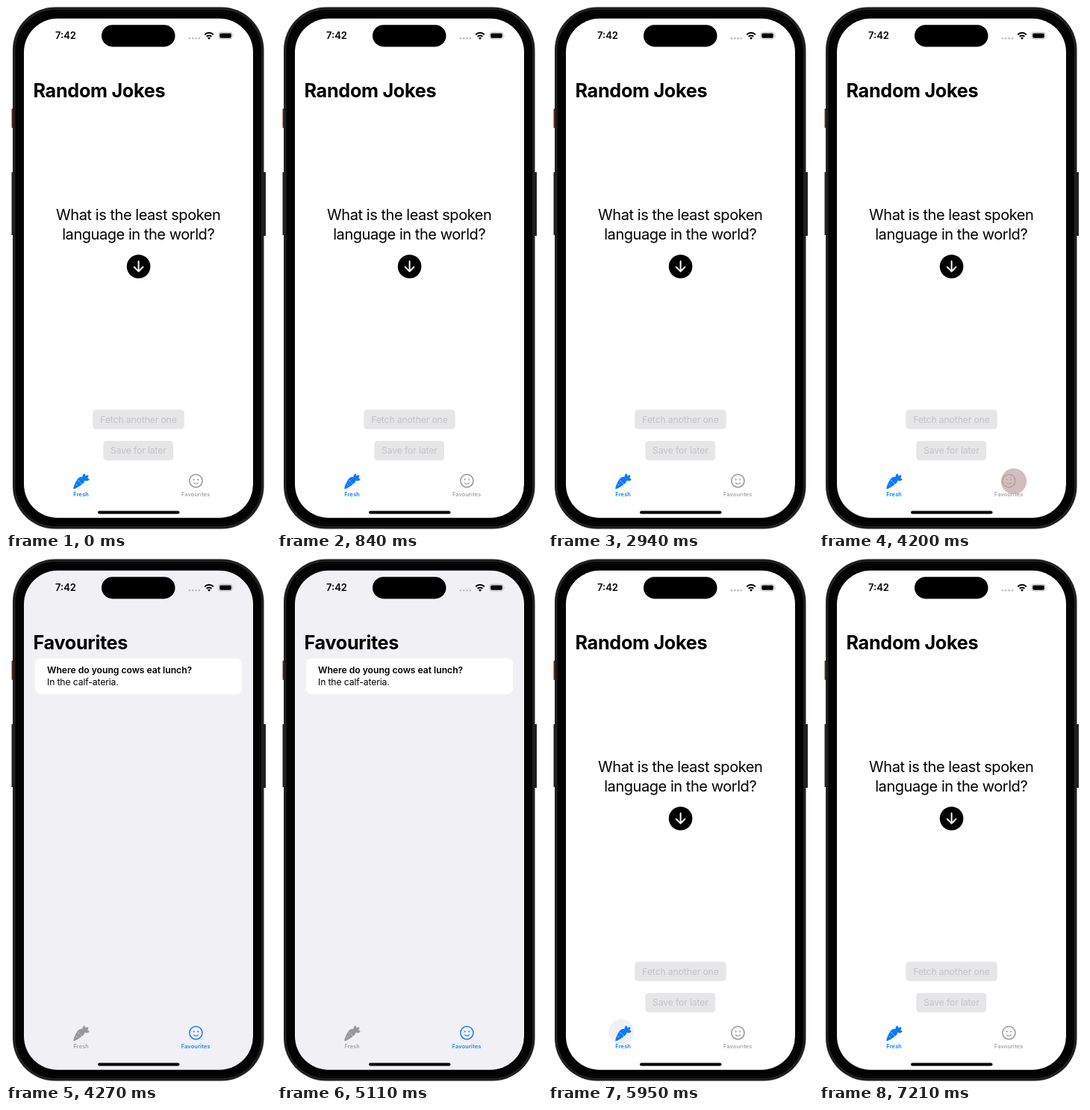
An HTML page for the animation above (8 s loop, 355 by 700 pixels).

```html
<!DOCTYPE html>
<html lang="en">
<head>
<meta charset="utf-8">
<title>Random Jokes</title>
<style>
html, body { margin: 0; width: 100%; height: 100%; overflow: hidden; background: #fff; }
svg { display: block; width: 355px; height: 700px; }
text { font-family: Inter, "Liberation Sans", sans-serif; fill: #000; }
.mid { text-anchor: middle; }
.title { font-size: 25.2px; font-weight: 700; letter-spacing: -.3px; }
.ask { font-size: 20px; letter-spacing: -.45px; }
.body { font-size: 12.2px; letter-spacing: -.13px; }
.head { font-weight: 600; letter-spacing: -.04px; }
.off { fill: #c3c3c5; }
.tab { color: #98989b; }
.tab.on { color: #0a7aff; }
#savedTab.on { color: #1680f5; }
.tab text { font-size: 7.3px; font-weight: 500; letter-spacing: .2px; fill: currentColor; }
.tab.on text { font-weight: 600; }
</style>
</head>
<body>
<svg viewBox="0 0 355 700">
  <!-- phone body -->
  <rect x="7.5" y="137" width="4" height="26" rx="1" fill="#6b2c1c"/>
  <path d="M7.500 222h4v46h-4zM7.500 255h4v51h-4zM344 222h4v85h-4z" fill="#222"/>
  <rect x="9" y="1.5" width="336.5" height="697" rx="57" fill="#202020"/>
  <rect x="12.5" y="5" width="329.5" height="690" rx="54" fill="#020202"/>
  <rect id="screen" x="24" y="16.7" width="307" height="667" rx="45"/>

  <!-- status bar -->
  <text x="66" y="44.200" font-size="13" font-weight="600">7:42</text>
  <rect x="128" y="25.200" width="98.500" height="29.200" rx="14.600"/>
  <path d="M246 43.2h13.5" stroke="#b9b9bc" stroke-width="2.6" stroke-linecap="round" stroke-dasharray="0 4.3"/>
  <path d="M266.2 38.2a8.2 8.2 0 0 1 11.6 0M268.6 40.8a4.8 4.8 0 0 1 6.8 0" fill="none" stroke="#000" stroke-width="2"/>
  <path d="M272 44.8l-2-2.1a2.9 2.9 0 0 1 4 0z"/>
  <rect x="285" y="35.2" width="18" height="8.8" rx="2.8" fill="none" stroke="#aaa" stroke-width=".8"/>
  <rect x="286.2" y="36.4" width="15.6" height="6.4" rx="1.7"/>
  <path d="M304.2 38.2q1.4 1.4 0 2.8z" fill="#aaa"/>

  <g id="fresh">
    <text class="title" x="36.5" y="121.6">Random Jokes</text>
    <text class="ask mid" x="177.2" y="286.4">What is the least spoken</text>
    <text class="ask mid" x="177.2" y="312.2">language in the world?</text>
    <circle cx="177.6" cy="348" r="15.8"/>
    <path d="M177.6 341v13.4m-5.8-5.6l5.8 5.8 5.8-5.8" fill="none" stroke="#fff" stroke-width="2" stroke-linecap="round" stroke-linejoin="round"/>
    <rect x="116.3" y="539.3" width="122.4" height="26" rx="4.5" fill="#e6e6e8"/>
    <text class="body mid off" x="177.5" y="556.6">Fetch another one</text>
    <rect x="130.3" y="581" width="93.8" height="26" rx="4.5" fill="#e6e6e8"/>
    <text class="body mid off" x="177.3" y="598.4">Save for later</text>
  </g>

  <g id="saved">
    <text class="title" x="36.5" y="121.6">Favourites</text>
    <rect x="39" y="134" width="277" height="48" rx="8" fill="#fff"/>
    <text class="body head" x="55" y="154.4">Where do young cows eat lunch?</text>
    <text class="body" x="55" y="169.8">In the calf-ateria.</text>
  </g>

  <!-- tab bar -->
  <circle id="glow" cx="98.3" cy="633" r="17" fill="#f1f0f5"/>
  <g class="tab" id="freshTab">
    <path d="M90.4 645c-.8-1.2 2.4-9 5-12.600 2.200-3 5.400-4.800 8.400-2.400 2.900 2.400 1.600 6.100-1 8.300-3.500 3-11.600 7.800-12.400 6.700z" fill="currentColor"/>
    <path d="M102.600 631c-.6-2.600.2-4.800 2.200-6.400 1.300 1 1.700 2.200 1.500 3.500 1.200-1.400 2.600-1.800 4-1.200.3 1.500-.2 2.800-1.500 3.800 1.200 0 2.200.5 2.900 1.700-1.600 2-3.700 2.500-6.300 1.600z" fill="currentColor"/>
    <path id="notches" d="M96.400 634l1.800 1.200M101.600 638.600l-2-1.600M94 639l1.200.8" stroke-width=".6" stroke-linecap="round"/>
    <text class="mid" x="100.700" y="654.700">Fresh</text>
  </g>
  <g class="tab" id="savedTab">
    <circle cx="254.400" cy="634.300" r="8.600" fill="none" stroke="currentColor" stroke-width="1.500"/>
    <ellipse cx="251.600" cy="632.600" rx=".9" ry="1.200" fill="currentColor"/>
    <ellipse cx="257.200" cy="632.600" rx=".9" ry="1.200" fill="currentColor"/>
    <path d="M251.600 637.200q2.800 2.200 5.600 0" fill="none" stroke="currentColor" stroke-width="1.100" stroke-linecap="round"/>
    <text class="mid" x="254.200" y="654.700">Favourites</text>
  </g>
  <rect x="123" y="674.400" width="109.500" height="4" rx="2"/>
  <circle id="touch" r="17.200" fill="#bfa3a3"/>
</svg>
<script>
const LOOP = 8000, STEP = 70;
const OPEN = 4270, BACK = 5950;
const $ = id => document.getElementById(id);
const show = (id, opacity) => $(id).setAttribute('opacity', opacity);

// A tap fades in over the two steps before the page switches.
const press = (t, end) => t >= end - 2 * STEP && t < end ? (t < end - STEP ? .35 : .7) : 0;

function draw(now) {
  const t = Math.floor(now % LOOP / STEP) * STEP;
  const saved = t >= OPEN && t < BACK;
  const paper = saved ? '#f1f0f5' : '#fff';
  $('screen').setAttribute('fill', paper);
  $('notches').setAttribute('stroke', paper);
  show('saved', +saved);
  show('fresh', +!saved);
  $('savedTab').classList.toggle('on', saved);
  $('freshTab').classList.toggle('on', !saved);

  const right = press(t, OPEN), left = press(t, BACK);
  $('touch').setAttribute('cx', right ? 261 : 98.3);
  $('touch').setAttribute('cy', right ? 635 : 633);
  show('touch', right + left);
  show('glow', t >= BACK ? Math.max(0, 1 - (t - BACK) / (3 * STEP)) : 0);
  requestAnimationFrame(draw);
}
requestAnimationFrame(draw);
</script>
</body>
</html>
```
